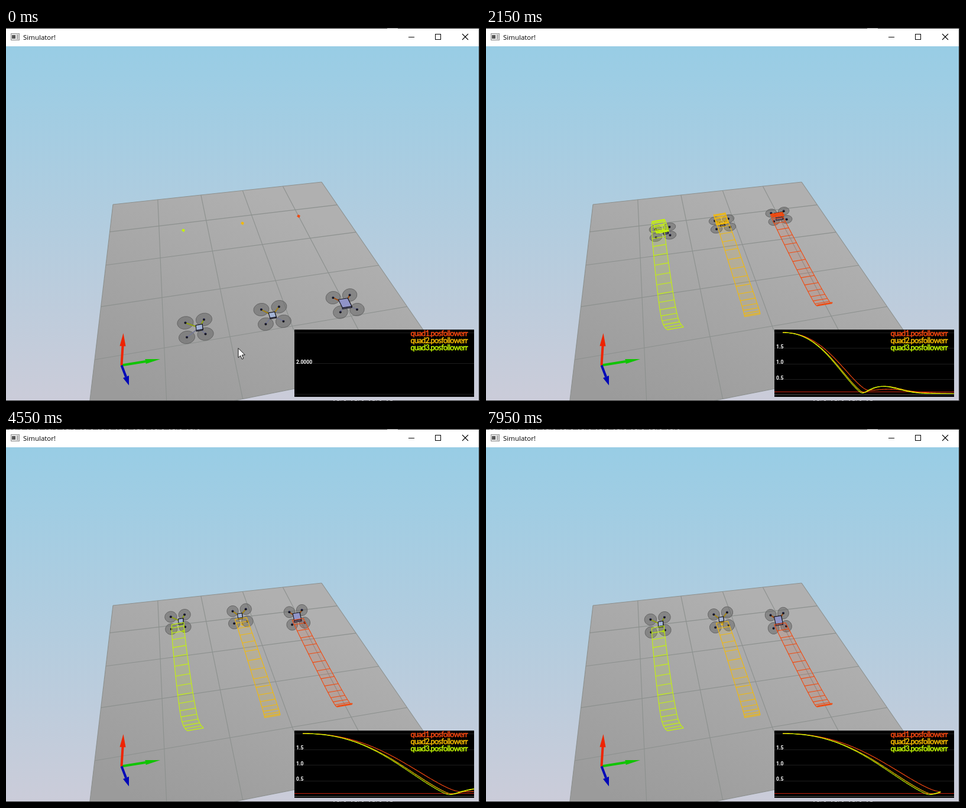
These frames come from a looping animation (802 by 632 pixels, 8 s). An HTML page with a canvas:

```html
<!DOCTYPE html>
<html lang="en">
<head>
<meta charset="utf-8">
<title>Simulator!</title>
<style>
html, body { margin: 0; width: 100%; height: 100%; overflow: hidden; background: #fff; }
canvas { display: block; }
</style>
</head>
<body>
<canvas id="stage" width="802" height="632"></canvas>
<script>
const ctx = document.getElementById('stage').getContext('2d');
const LOOP = 8000, STEP = 77.2;
const RUN_STARTS = [0, 3425, 6909];
const CURSOR_GONE = 1700, STRIP_APPEARS = 3470;
const BAR_INTERVAL = 67;

// drift: how far the flight bows away from the straight line between start and goal
const drones = [
  { name: 'quad1', color: '#ff4a10', line: '#f04a10', target: [495, 319], start: [573.7, 467], goal: [495.5, 319],
    drift: [-2, 7], pace: 0.95, rebound: 0.5, residual: 0.13, lean: 6.2, width: 0.94, body: 0.56, bodyX: 0, roll: 0 },
  { name: 'quad2', color: '#ffc000', line: '#f2b90c', target: [400, 331], start: [450.7, 487], goal: [400, 332],
    drift: [0, -4], pace: 1.01, rebound: 1, residual: 0.04, lean: 3.75, width: 1, body: 0.35, bodyX: 0, roll: 0 },
  { name: 'quad3', color: '#c8ff00', line: '#c4f20a', target: [300, 343], start: [320.5, 509], goal: [299, 346],
    drift: [-11, -9], pace: 1.03, rebound: 1, residual: 0.02, lean: 1.3, width: 1.05, body: 0.35, bodyX: 0.42, roll: -0.28 }
];

const mix = (a, b, q) => a + (b - a) * q;
const decay = (t, life, power) => Math.exp(-((t / life) ** power));

// Signed distance to the goal: 1 at the start, 0 on arrival, negative while overshooting.
function distance(drone, t) {
  const s = t * drone.pace;
  const d = Math.cos(Math.PI / 2 * (s / 1000) ** 1.08) * decay(s, 1205, 4);
  return d < 0 ? d * drone.rebound : d;
}

function followError(drone, t) {
  const d = distance(drone, t);
  const rest = 0.03 + drone.residual * decay(t, 1600, 4);
  return Math.sqrt(4 * d * d + rest * rest * (1 - d * d));
}

function pose(drone, t) {
  const p = 1 - distance(drone, t);
  const q = 1.3 * p / (1 + 0.3 * p);
  const drift = (1 - Math.exp(-t / 160)) * decay(t, 1300, 4);
  const [x, y] = [0, 1].map(i => mix(drone.start[i], drone.goal[i], q) + drone.drift[i] * drift);

  // Pitch forward to accelerate, back to brake, then level out.
  const pitch = -46 * Math.cos(Math.PI * (t - 240) / 800) * (1 - Math.exp(-t / 40)) * decay(t, 1400, 6);
  const elevation = (mix(55, 38, q) + pitch) * Math.PI / 180;
  const span = mix(15, 11.4, q);
  const tilt = -0.16 + drone.roll * Math.exp(-(((t - 115) / 70) ** 2));
  return { x, y, u: [span * drone.width, span * drone.width * tilt],
    v: [drone.lean * mix(1, 0.4, q), span * Math.sin(elevation)] };
}

function rect(x, y, w, h, fill) {
  ctx.fillStyle = fill;
  ctx.fillRect(x, y, w, h);
}

function path(points, { fill, stroke, width = 1, close = false }) {
  ctx.beginPath();
  points.forEach(([x, y]) => ctx.lineTo(x, y));
  if (close) ctx.closePath();
  if (fill) { ctx.fillStyle = fill; ctx.fill(); }
  if (stroke) { ctx.strokeStyle = stroke; ctx.lineWidth = width; ctx.stroke(); }
}

const polygon = (points, fill, stroke, width) => path(points, { fill, stroke, width, close: true });
const line = (points, stroke, width) => path(points, { stroke, width });

function ellipse([x, y], rx, ry, angle, fill, stroke) {
  ctx.beginPath();
  ctx.ellipse(x, y, rx, ry, angle, 0, Math.PI * 2);
  ctx.fillStyle = fill;
  ctx.fill();
  if (stroke) { ctx.strokeStyle = stroke; ctx.lineWidth = 1; ctx.stroke(); }
}

function text(str, x, y, font, fill, align = 'left') {
  ctx.font = font;
  ctx.textAlign = align;
  ctx.fillStyle = fill;
  ctx.fillText(str, x, y);
}

// Perspective view of floor cell corners, counted from the far left.
function floorPoint(column, row) {
  const u = column / 5, v = row / 4;
  const w = 1 + 0.0936 * u - 0.358 * v;
  return [(181 + 403 * u - 84.7 * v) / w, (299 - 13.6 * u + 61.8 * v) / w];
}

function drawWorld() {
  const sky = ctx.createLinearGradient(0, 31, 0, 632);
  sky.addColorStop(0, '#98cde5');
  sky.addColorStop(1, '#cbccd9');
  rect(0, 31, 802, 601, sky);

  const floor = ctx.createLinearGradient(230, 632, 400, 265);
  floor.addColorStop(0, '#9b9b9b');
  floor.addColorStop(1, '#b0b0b0');
  polygon([floorPoint(0, 0), floorPoint(5, 0), floorPoint(5, 5), floorPoint(0, 5)], floor);
  for (let i = 0; i <= 5; i++) {
    line([floorPoint(0, i), floorPoint(5, i)], '#8c908e', 1.1);
    line([floorPoint(i, 0), floorPoint(i, 5)], '#8c908e', 1.1);
  }
}

function drawArrow(tip, neck, side, color) {
  const [nx, ny] = neck, [sx, sy] = side;
  line([[195.5, 571.5], neck], color, 4);
  polygon([tip, [nx + sx, ny + sy], [nx - sx, ny - sy]], color);
}

function drawAxes() {
  drawArrow([261, 561], [236, 565], [0.7, 4], '#10c400');
  drawArrow([198.5, 517], [197.5, 539], [5, 0.3], '#ee2400');
  drawArrow([208, 605.5], [203, 591], [5, -2], '#0008b8');
}

function drawDrone(drone, t) {
  const { x, y, u, v } = pose(drone, t);
  const point = (a, b, dy = 0) => [x + a * u[0] + b * v[0], y + a * u[1] + b * v[1] + dy];
  const rotors = [[-1, -1], [1, -1], [-1, 1], [1, 1]];
  const angle = Math.atan2(u[1], u[0]);
  const center = point(drone.bodyX, 0);

  rotors.forEach(([a, b]) =>
    ellipse(point(a, b), u[0] * 0.87, v[1] * 0.75 + 1.5, angle, 'rgba(88,88,88,.45)', '#666'));
  rotors.forEach(([a, b]) => {
    const hub = point(a, b);
    line([center, hub], b > 0 ? '#777a92' : '#5a5420', 2);
    if (b < 0) {
      ctx.globalAlpha = 0.65;
      line([center, hub], drone.line, 1.4);
      ctx.globalAlpha = 1;
    }
    ellipse(hub, 2, 2, 0, '#15151d');
    rect(hub[0] - 0.5, hub[1] - 2, 1.2, 1.2, '#34348a');
  });

  const half = drone.body, thick = 1 + (1 - v[1] / 15) * 12 * half;
  const corner = (a, b, dy) => point(drone.bodyX + a * half, b * half, dy);
  const face = dy => [corner(-1, -1, dy), corner(1, -1, dy), corner(1, 1, dy), corner(-1, 1, dy)];
  const top = face(-thick / 2), base = face(thick / 2);
  polygon([top[3], top[2], base[2], base[3]], '#62647f', '#14141c');
  polygon([top[1], top[2], base[2], base[1]], '#50526c', '#14141c');
  polygon(top, half > 0.5 ? '#9094c8' : '#a4b4d6', '#14141c', 1.1);
}

function drawTrail(drone, t) {
  if (t < 60) return;
  const bars = [];
  for (let time = 0; time <= t; time += BAR_INTERVAL) {
    const { x, y, u } = pose(drone, time);
    const dx = u[0] * 0.88, dy = u[0] * -0.15;
    bars.push([[x - dx, y - dy], [x + dx, y + dy]]);
  }
  const left = bars.map(b => b[0]), right = bars.map(b => b[1]);
  ctx.globalAlpha = 0.1;
  polygon([...left, ...right.slice().reverse()], drone.color);
  ctx.globalAlpha = 1;
  [left, right, ...bars].forEach(edge => line(edge, drone.line, 1.1));
}

function drawTarget({ target: [x, y], line: color }) {
  polygon([[x - 3, y], [x - 0.5, y - 3], [x + 3, y - 1], [x + 1, y + 3]], color);
}

function drawCursor() {
  const outline = [[0, 0], [0, 16], [3.7, 12.6], [6.3, 18.5], [8.8, 17.4], [6.3, 11.6], [11.3, 11.4]];
  polygon(outline.map(([x, y]) => [x + 393, y + 542.5]), '#fff', '#111');
}

// Largest 1-2-5 step that splits the range into more than three parts.
function gridStep(range) {
  const base = 10 ** Math.floor(Math.log10(range));
  return [5, 2, 1, 0.5, 0.2, 0.1].map(m => m * base).find(s => range / s > 3);
}

function drawCurves(t) {
  const originX = 502, top = 516, height = 103.5;
  const scale = (792 - originX) / Math.max(t, 1131);
  const times = Array.from({ length: Math.ceil(t / 8) }, (_, i) => i * 8).concat(t);
  const curves = drones.map(d => times.map(time => followError(d, time)));
  const low = Math.min(...curves.flat());
  const range = 2 - low, step = gridStep(range);
  const decimals = Math.max(0, Math.ceil(-Math.log10(step) - 1e-9));
  const toY = value => top + (2 - value) / range * height;

  for (let value = 2; toY(value) < 625; value -= step) {
    const y = toY(value);
    gridLine(y, Math.abs(value) < 1e-6 ? '#555' : undefined);
    if (value < 2 && value >= low) axisLabel(value.toFixed(decimals), y + 0.8);
  }
  if (low < 0.1) gridLine(toY(0.1), '#c4200e');
  curves.forEach((values, i) =>
    line(values.map((value, j) => [originX + times[j] * scale, toY(value)]), drones[i].color, 1.1));
}

const gridLine = (y, color = '#1d1d1d') => rect(488, Math.round(y), 304, 1, color);
const axisLabel = (label, y) => text(label, 491, y, 'bold 8.6px Roboto, sans-serif', '#fff');

function drawGraph(t) {
  ctx.save();
  ctx.beginPath();
  ctx.rect(488, 511, 304, 114);
  ctx.clip();
  rect(488, 511, 304, 114, '#000');
  if (t > 0) {
    drawCurves(t);
  } else {
    [516, 568, 620].forEach(y => gridLine(y));
    axisLabel('2.0000', 568.5);
  }
  ctx.letterSpacing = '-0.6px';
  ctx.lineWidth = 0.45;
  drones.forEach((d, i) => {
    const label = d.name + '.posfollowerr', y = 522.3 + i * 11.8;
    text(label, 781, y, '12.6px Lato, sans-serif', d.color, 'right');
    ctx.strokeStyle = d.color;
    ctx.strokeText(label, 781, y);
  });
  ctx.restore();
}

function dashes(x, y, count, color) {
  for (let i = 0; i < count; i++) rect(x + i * 6, y, i * 7 % 5, 1, color);
}

function drawWindow(t) {
  rect(0, 0, 802, 31, '#fff');
  rect(8, 9, 15, 12, '#8d8d8d');
  rect(9, 10, 13, 10, '#e9e9e9');
  rect(10, 12, 6, 6, '#555');
  rect(18, 11, 3, 8, '#b5b5b5');
  text('Simulator!', 29, 20, '11.5px "Open Sans", sans-serif', '#000');
  rect(681, 15, 10, 1, '#000');
  ctx.strokeStyle = '#000';
  ctx.lineWidth = 1;
  ctx.strokeRect(726.5, 10.5, 9, 9);
  line([[772, 10], [782, 20]], '#000', 1.1);
  line([[782, 10], [772, 20]], '#000', 1.1);

  rect(0, 0, 802, 1, '#1c1c1c');
  rect(645, 0, 18, 1, '#888');
  if (t >= STRIP_APPEARS) dashes(0, 0, 56, '#666');
  rect(800, 0, 2, 632, '#1c1c1c');
  rect(0, 631, 802, 1, '#2a2a2a');
  dashes(548, 631, 18, '#888');
}

function render() {
  const elapsed = performance.now() % LOOP;
  const t = Math.floor((elapsed + 8) / STEP) * STEP;
  const runTime = t - RUN_STARTS.filter(s => s <= t).pop();
  drawWorld();
  drones.forEach(drawTarget);
  drones.forEach(d => drawDrone(d, runTime));
  drones.forEach(d => drawTrail(d, runTime));
  drawAxes();
  if (t < CURSOR_GONE) drawCursor();
  drawGraph(runTime);
  drawWindow(t);
  requestAnimationFrame(render);
}
requestAnimationFrame(render);
</script>
</body>
</html>
```
